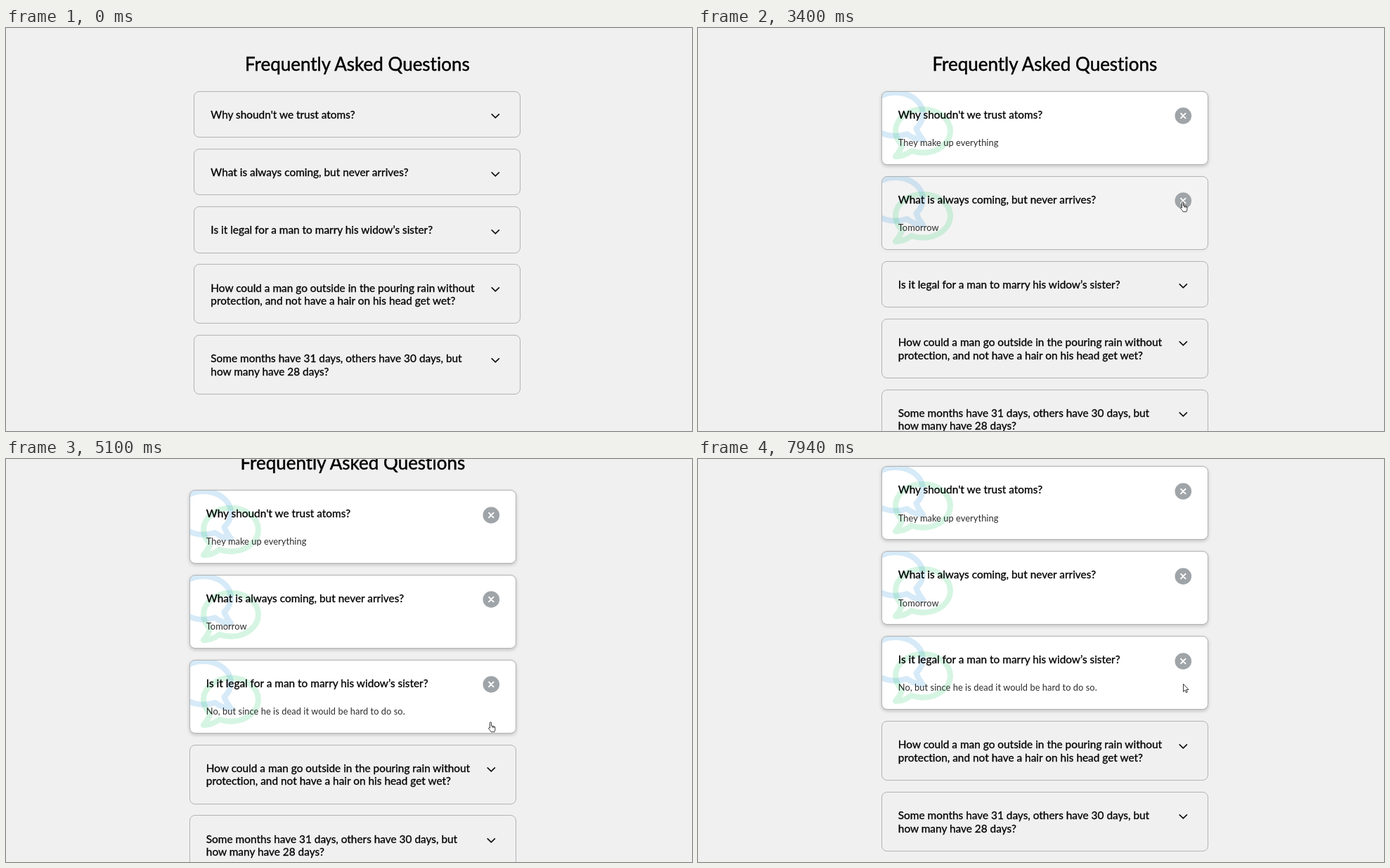
Recreate the animation shown at these times as an HTML page. Size 976 by 574 pixels, loop 8 s.

```html
<!DOCTYPE html>
<html lang="en">
<head>
<meta charset="utf-8">
<title>FAQ</title>
<style>
  @property --open { syntax: "<number>"; inherits: true; initial-value: 0; }
  @property --fade { syntax: "<number>"; inherits: true; initial-value: 0; }

  html, body { margin: 0; width: 100%; height: 100%; overflow: hidden; background: #f0f0f0; }
  body {
    position: relative; color: #000;
    font-family: Lato, "Open Sans", sans-serif; font-variant-ligatures: none;
  }

  #page {
    position: absolute; left: 267.3px; top: 0; width: 465px;
    animation: scrollbar 8s step-end infinite, scroll 8s linear infinite;
  }
  h1 {
    margin: 0; padding: 35px 0 22.75px; font-size: 26px; line-height: 32px;
    font-weight: 400; text-align: center; white-space: nowrap;
    -webkit-text-stroke: .45px #000;
  }

  .card {
    position: relative; box-sizing: border-box; overflow: hidden;
    height: calc(47.8px + var(--lines) * 18.6px + var(--open) * 38.7px);
    margin-bottom: 15.8px; border: 1px solid #b0b3b5; border-radius: 8px;
    background: rgba(255, 255, 255, var(--fade));
    box-shadow: 0 2px 5px rgba(0, 0, 0, calc(var(--fade) * .2));
    animation: 8s linear infinite;
  }
  .card > * { position: absolute; }
  .question {
    left: 23px; top: 23.2px; font-size: 15.4px; line-height: 18.6px;
    white-space: nowrap; -webkit-text-stroke: .3px #000;
  }
  .answer {
    left: 23px; top: calc(45.8px + var(--lines) * 18.6px);
    font-size: 12.8px; line-height: 16px; letter-spacing: .07px;
    color: #2b2b2b; white-space: nowrap;
  }
  .answer, .bubbles, .close { opacity: var(--open); }
  .chevron { opacity: calc(1 - var(--open)); }
  .bubbles { left: -1px; top: -1px; }
  .chevron, .close { left: 416px; top: 22.6px; }

  .card:nth-of-type(1) { animation-name: card1; }
  .card:nth-of-type(2) { animation-name: card2; }
  .card:nth-of-type(3) { animation-name: card3; }
  .card:nth-of-type(4) { animation-name: card4; }
  .card:nth-of-type(5) { animation-name: card5; }

  #cursor { position: absolute; left: 0; top: 0; animation: move 8s linear infinite; }
  #cursor svg { position: absolute; left: 0; top: 0; overflow: visible; }
  #hand { animation: hand 8s step-end infinite; }
  #arrow { animation: arrow 8s step-end infinite; }
  #click {
    position: absolute; left: -8px; top: -7px; width: 16px; height: 16px; border-radius: 50%;
    background: rgba(255, 240, 0, .65); animation: click 8s step-end infinite;
  }

  @keyframes scrollbar { 0% { left: 267.3px } 30.75%, 100% { left: 260.8px } }
  @keyframes scroll {
    0%, 62% { top: 0 }
    63.75% { top: -45.5px }
    65%, 100% { top: -79.5px }
  }

  @keyframes card1 {
    0%, 30.749% { --open: 0; --fade: 0 }
    30.75% { --open: 1; --fade: .2 }
    34.5%, 100% { --open: 1; --fade: 1 }
  }
  @keyframes card2 {
    0%, 42.499% { --open: 0; --fade: 0 }
    42.5% { --open: 1; --fade: .2 }
    46.25%, 100% { --open: 1; --fade: 1 }
  }
  @keyframes card3 {
    0%, 54.874% { --open: 0; --fade: 0 }
    54.875% { --open: 1; --fade: .2 }
    58.6%, 100% { --open: 1; --fade: 1 }
  }
  @keyframes card4 {
    0%, 72.249% { --open: 0; --fade: 0 }
    72.25% { --open: 1; --fade: .2 }
    76%, 96.499% { --open: 1; --fade: 1 }
    96.5% { --open: 0; --fade: .85 }
    99.2%, 100% { --open: 0; --fade: 0 }
  }
  @keyframes card5 {
    0%, 83.124% { --open: 0; --fade: 0 }
    83.125% { --open: 1; --fade: .2 }
    86.5%, 87.749% { --open: 1; --fade: 1 }
    87.75% { --open: 0; --fade: .85 }
    91.5%, 100% { --open: 0; --fade: 0 }
  }

  @keyframes move {
    0%, 2% { transform: translate(929px, 499px) }
    9.75% { transform: translate(484px, 98px) }
    11.625% { transform: translate(482px, 97px) }
    16.375%, 18.5% { transform: translate(541px, 125px) }
    24.25% { transform: translate(679px, 127px) }
    26.125% { transform: translate(686px, 127px) }
    28.875%, 32.5% { transform: translate(693px, 127px) }
    38.5%, 44.4% { transform: translate(689px, 247px) }
    52%, 66.25% { transform: translate(689px, 374px) }
    70.375%, 72.5% { transform: translate(690px, 409px) }
    80%, 88.75% { transform: translate(692px, 542px) }
    94.5%, 96.75% { transform: translate(690px, 409px) }
    99.2%, 100% { transform: translate(690px, 320px) }
  }
  @keyframes hand {
    0%, 33%, 45%, 73.5%, 89.7%, 97.2%, 100% { opacity: 0 }
    26.125%, 37.6%, 51%, 79%, 93.8% { opacity: 1 }
  }
  @keyframes arrow {
    0%, 26.125%, 37.6%, 51%, 79%, 93.8% { opacity: 0 }
    2%, 33%, 45%, 73.5%, 89.7%, 97.2%, 100% { opacity: 1 }
  }
  @keyframes click {
    0%, 30.75%, 42.5%, 54.875%, 72.25%, 83.125%, 87.75%, 96.5%, 100% { opacity: 0 }
    28.875%, 40.375%, 53%, 70.375%, 81%, 85.875%, 95.5% { opacity: 1 }
  }
</style>
</head>
<body>
<svg width="0" height="0" style="position:absolute">
  <path id="bubble" fill="none" stroke-width="48" stroke-linejoin="round"
    d="M256 56C128 56 24 138 24 240C24 284 43 322 80 361Q62 412 24 456C80 456 124 434 159 408Q205 424 256 424C384 424 488 342 488 240S384 56 256 56Z"/>
</svg>

<main id="page"><h1>Frequently Asked Questions</h1></main>

<div id="cursor">
  <div id="click"></div>
  <svg id="arrow" width="12" height="16">
    <path d="M.5.5v11l2.5-2.4 1.6 3.7 1.7-.7-1.6-3.6H8z" fill="#fff" stroke="#222" stroke-width=".9"/>
  </svg>
  <svg id="hand" width="12" height="16">
    <path transform="translate(-3.2 .2)" fill="#fff" stroke="#222" stroke-width=".9" stroke-linejoin="round"
      d="M2.6 9V1.6a1.1 1.1 0 0 1 2.2 0V6l4.3.9q1 .3 1 1.4v2.4q0 2-1 3.8H4.4Q3.3 12.4 1 10.2q-.8-1.2.2-1.6.8-.2 1.4.7M6.7 6.6v2M8.5 7v1.8"/>
  </svg>
</div>

<script>
  const items = [
    ["Why shoudn't we trust atoms?", "They make up everything"],
    ["What is always coming, but never arrives?", "Tomorrow"],
    ["Is it legal for a man to marry his widow’s sister?", "No, but since he is dead it would be hard to do so."],
    ["How could a man go outside in the pouring rain without<br>protection, and not have a hair on his head get wet?", "He was bald."],
    ["Some months have 31 days, others have 30 days, but<br>how many have 28 days?", "All of them"]
  ];

  const card = ([question, answer]) => `
    <div class="card" style="--lines:${question.split("<br>").length}">
      <svg class="bubbles" width="110" height="110">
        <use href="#bubble" stroke="#3498db" opacity=".2" transform="translate(63 -7.5) scale(-.168 .168)"/>
        <use href="#bubble" stroke="#2ecc71" opacity=".2" transform="translate(16 16.4) scale(.168)"/>
      </svg>
      <div class="question">${question}</div>
      <div class="answer">${answer}</div>
      <svg class="chevron" width="24" height="24">
        <path d="M7.2 9.8l5.1 5.1L17.4 9.8" fill="none" stroke="#111" stroke-width="1.7" stroke-linecap="round"/>
      </svg>
      <svg class="close" width="25" height="24">
        <circle cx="12.3" cy="12" r="11.8" fill="#9fa4a8"/>
        <path d="M9 8.7l6.6 6.6m0-6.6L9 15.3" stroke="#fff" stroke-width="1.9" stroke-linecap="round"/>
      </svg>
    </div>`;

  document.getElementById("page").insertAdjacentHTML("beforeend", items.map(card).join(""));
</script>
</body>
</html>
```
